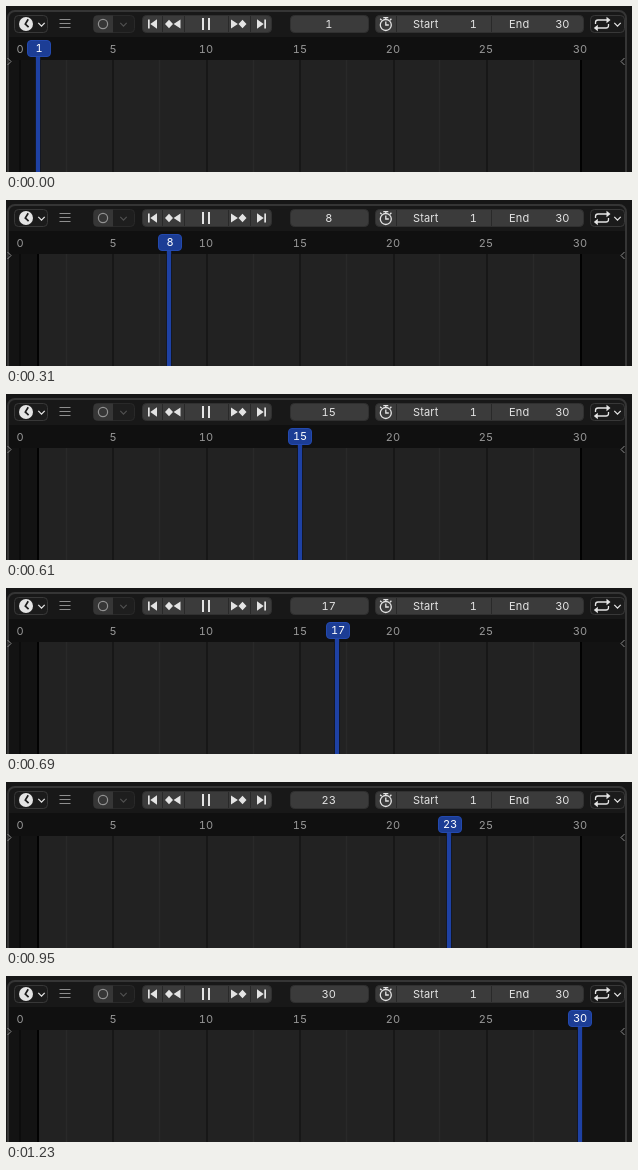
An HTML page for the animation above (1.27 s loop, 626 px wide and 166 px high).

```html
<!DOCTYPE html>
<html lang="en">
<head>
<meta charset="utf-8">
<title>Timeline playback</title>
<style>
  html, body { margin: 0; width: 100%; height: 100%; overflow: hidden; background: #161616; }
  svg { display: block; width: 626px; height: 166px; }
  text { font: 11px Inter, "Noto Sans", sans-serif; font-feature-settings: "tnum"; fill: #e4e4e4; }
  .mid { text-anchor: middle; }
  .end { text-anchor: end; }
  .name { letter-spacing: .15px; }
  .tick { fill: #989898; text-anchor: middle; }
  .field { fill: #3b3b3b; stroke: #303030; }
  .menu { fill: #1b1b1b; stroke: #383838; }
  .icon { fill: #e4e4e4; }
  .line { fill: none; stroke: #e4e4e4; stroke-width: 1.3; }
  .gap { stroke: #292929; }
</style>
</head>
<body>
<svg viewBox="0 0 626 166">
  <defs>
    <clipPath id="panel"><rect x="2" y="5" width="618" height="180" rx="7"/></clipPath>
    <path id="skip" d="M0 -4.5h1.7v9H0zM9 -4.8v9.6L2.3 0z"/>
    <path id="key" d="M4 -4.2L8 0 4 4.2 0 0zM15.5 -4.5v9L8.6 0z"/>
    <path id="chevron" d="M-3.2 -1.6L0 1.6 3.2 -1.6"/>
  </defs>

  <g clip-path="url(#panel)">
    <rect width="626" height="166" fill="#181818"/>
    <rect y="31" width="626" height="23" fill="#101010"/>
    <rect y="54" width="626" height="112" fill="#131313"/>
    <rect x="32" y="54" width="542" height="112" fill="#222"/>
    <g id="grid"></g>
    <path d="M32 54V166M575 54V166" stroke="#020202" stroke-width="2"/>
    <g id="ruler"></g>
  </g>
  <rect x="2" y="5" width="618" height="180" rx="7" fill="none" stroke="#353535" stroke-width="2"/>
  <path d="M1.5 52l3.5 3.5-3.5 3.5M618.5 52l-3.5 3.5 3.5 3.5" fill="none" stroke="#8c8c8c"/>

  <!-- header -->
  <rect class="menu" x="8.5" y="9.5" width="33" height="17" rx="4"/>
  <circle class="icon" cx="20" cy="18" r="7"/>
  <path d="M22.2 13.2L19.3 18l3.3 3.2" fill="none" stroke="#1b1b1b" stroke-width="1.7"/>
  <use href="#chevron" class="line" x="35.5" y="18.5"/>
  <path d="M53.5 13.5h11M53.5 17.5h11M53.5 21.5h11" stroke="#8e8e8e"/>

  <rect x="87.5" y="9.5" width="41" height="17" rx="4" fill="#1e1e1e" stroke="#292929"/>
  <path d="M107 9.5H91.5a4 4 0 0 0-4 4v9a4 4 0 0 0 4 4H107z" fill="#363636"/>
  <circle cx="97" cy="18" r="4.6" fill="none" stroke="#929292" stroke-width="1.2"/>
  <use href="#chevron" x="117.5" y="18.5" fill="none" stroke="#505050" stroke-width="1.2"/>

  <rect class="field" x="136.5" y="9.5" width="129" height="17" rx="4"/>
  <path class="gap" d="M156.5 10v16M178.5 10v16M222.5 10v16M244.5 10v16"/>
  <g class="icon">
    <use href="#skip" x="142" y="18"/>
    <use href="#key" x="159" y="18"/>
    <path d="M196 12h2v12h-2zM202 12h2v12h-2z"/>
    <use href="#key" transform="translate(240.5 18) scale(-1 1)"/>
    <use href="#skip" transform="translate(260 18) scale(-1 1)"/>
  </g>

  <rect class="field" x="284.5" y="9.5" width="78" height="17" rx="4"/>
  <text class="mid" id="count" x="322.7" y="22">1</text>

  <rect class="field" x="369.5" y="9.5" width="208" height="17" rx="4"/>
  <path class="gap" d="M390.5 10v16M485.5 10v16"/>
  <g class="line">
    <circle cx="379.8" cy="19" r="5.5"/>
    <path d="M377.3 11.7h5M379.8 12v2M379.8 15.5V19h3M384 14.2l1.4-1.4M375.6 14.2l-1.4-1.4"/>
  </g>
  <text class="name" x="407" y="22">Start</text>
  <text class="end" x="471" y="22">1</text>
  <text class="name" x="503" y="22">End</text>
  <text class="end" x="563.5" y="22">30</text>

  <rect class="menu" x="584.5" y="9.5" width="34" height="17" rx="4"/>
  <g class="line">
    <path d="M589.5 18v-1.5a2.5 2.5 0 0 1 2.5-2.5H601M602.5 18v1.5a2.5 2.5 0 0 1-2.5 2.5H591"/>
    <use href="#chevron" x="611.5" y="18.5"/>
  </g>
  <path class="icon" d="M600.5 10.8l4 3.2-4 3.2zM591.8 18.8l-4 3.2 4 3.2z"/>

  <g id="stem">
    <path d="M0 50V166" stroke="#141824" stroke-width="6"/>
    <path d="M0 50V166" stroke="#1e41a4" stroke-width="4"/>
  </g>
  <g id="head">
    <rect x="-11.5" y="34.5" width="23" height="16" rx="3.5" fill="#1c3d95" stroke="#2349ae"/>
    <text class="mid" id="label" y="46" style="fill:#fff">1</text>
  </g>
</svg>
<script>
  const $ = id => document.getElementById(id);
  const LOOP = 1270, LAST = 30;
  const xAt = n => 13.6 + 18.675 * n;

  const line = (x, color, w) =>
    `<path d="M${x} 54V166" stroke="${color}" stroke-width="${w}"/>`;
  let grid = "", ruler = "";
  for (let n = 0; n <= LAST; n += 5) {
    if (n < LAST) {
      grid += line(Math.ceil(xAt(n)), n ? "#171717" : "#0c0c0c", 2);
      grid += line(Math.ceil(xAt(n + 2.5)) - .5, "#292929", 1.4);
    }
    ruler += `<text class="tick" x="${Math.round(xAt(n))}" y="47">${n}</text>`;
  }
  $("grid").innerHTML = grid;
  $("ruler").innerHTML = ruler;

  // Most counts last 40 ms, these last 50.
  const slow = [1, 3, 5, 8, 11, 17, 22];
  const starts = [0];
  for (let n = 1; n < LAST; n++) starts.push(starts[n - 1] + (slow.includes(n) ? 50 : 40));

  function countAt(t) {
    const n = starts.filter(s => s <= t).length;
    return n === 28 ? 27 : n; // 27 is held, 28 is dropped
  }

  const moveTo = (id, x) => $(id).setAttribute("transform", `translate(${x} 0)`);

  let shown = 0;
  const begin = performance.now();
  function draw() {
    const n = countAt((performance.now() - begin) % LOOP);
    if (n !== shown) {
      shown = n;
      $("count").textContent = $("label").textContent = n;
      moveTo("stem", Math.round(xAt(n)));
      moveTo("head", Math.ceil(xAt(n) + .1));
    }
    requestAnimationFrame(draw);
  }
  draw();
</script>
</body>
</html>
```
